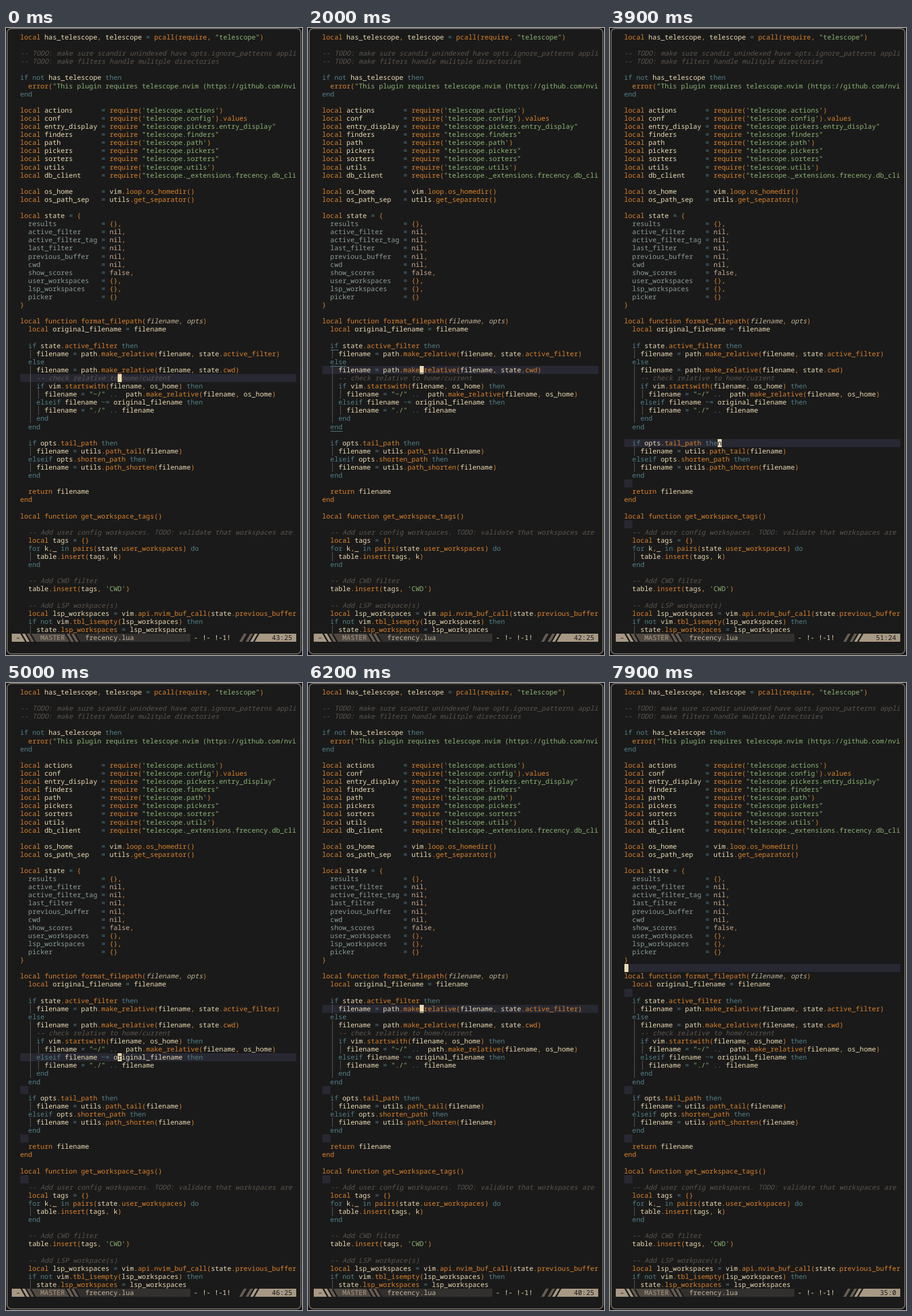
Write an HTML page that moves like this. It is 514 px wide and 1089 px high and loops after 8 s.

```html
<!DOCTYPE html>
<html lang="en">
<head>
<meta charset="utf-8">
<title>Editor cursor</title>
<style>
html, body { margin: 0; width: 100%; height: 100%; overflow: hidden; background: #111; }
#win { position: absolute; left: 1px; top: 0; width: 512px; height: 1088px; box-sizing: border-box;
  border: 2px solid #6b635a; border-radius: 8px; background: #1a1a1a; }
#code, svg { position: absolute; left: 0; top: 0; }
#code { width: 504px; height: 1089px; overflow: hidden; }
#code, text { font: 11.765px "Noto Sans Mono", "DejaVu Sans Mono", monospace;
  text-rendering: geometricPrecision; font-variant-ligatures: none; white-space: pre; }
#code div { position: absolute; left: 24.5px; height: 14.095px; line-height: 14.095px; }
.id { color: #ebdbb2; }
.or { color: #d9822b; }
.kw { color: #528088; }
.str { color: #8cb573; }
.key { color: #8b9d95; }
.nil { color: #c9ab93; }
.com { color: #5c544e; font-style: italic; }
.arg { color: #c3b497; font-style: italic; }
.bar { background: linear-gradient(#5f5750, #5f5750) 50% 0 / 1px 100% no-repeat; }
.match .pair { box-shadow: 0 -1px #528088 inset; }
#row { width: 480px; background: #282833; }
.blank { width: 14px; background: #282833; }
#cursor { width: 7.06px; background: #ebdbb2; color: #1a1a1a; }
</style>
</head>
<body>
<div id="win"></div>
<div id="code"></div>
<svg width="514" height="1089"></svg>
<script>
const source = `local has_telescope, telescope = pcall(require, "telescope")

-- TODO: make sure scandir unindexed have opts.ignore_patterns appli
-- TODO: make filters handle mulitple directories

if not has_telescope then
  error("This plugin requires telescope.nvim (https://github.com/nvi
end

local actions       = require('telescope.actions')
local conf          = require('telescope.config').values
local entry_display = require "telescope.pickers.entry_display"
local finders       = require "telescope.finders"
local path          = require('telescope.path')
local pickers       = require "telescope.pickers"
local sorters       = require "telescope.sorters"
local utils         = require('telescope.utils')
local db_client     = require("telescope._extensions.frecency.db_cli

local os_home       = vim.loop.os_homedir()
local os_path_sep   = utils.get_separator()

local state = {
  results           = {},
  active_filter     = nil,
  active_filter_tag = nil,
  last_filter       = nil,
  previous_buffer   = nil,
  cwd               = nil,
  show_scores       = false,
  user_workspaces   = {},
  lsp_workspaces    = {},
  picker            = {}
}

local function format_filepath(filename, opts)
  local original_filename = filename

  if state.active_filter then
  │ filename = path.make_relative(filename, state.active_filter)
  else
  │ filename = path.make_relative(filename, state.cwd)
  │ -- check relative to home/current
  │ if vim.startswith(filename, os_home) then
  │ │ filename = "~/" ..  path.make_relative(filename, os_home)
  │ elseif filename ~= original_filename then
  │ │ filename = "./" .. filename
  │ end
  end

  if opts.tail_path then
  │ filename = utils.path_tail(filename)
  elseif opts.shorten_path then
  │ filename = utils.path_shorten(filename)
  end

  return filename
end

local function get_workspace_tags()

  -- Add user config workspaces. TODO: validate that workspaces are
  local tags = {}
  for k,_ in pairs(state.user_workspaces) do
  │ table.insert(tags, k)
  end

  -- Add CWD filter
  table.insert(tags, 'CWD')

  -- Add LSP workpace(s)
  local lsp_workspaces = vim.api.nvim_buf_call(state.previous_buffer
  if not vim.tbl_isempty(lsp_workspaces) then
  │ state.lsp_workspaces = lsp_workspaces`;

const lines = source.split("\n");
const left = 24.5, charW = 7.059, rowH = 14.095;
const code = document.getElementById("code");
const svg = document.querySelector("svg");
const topOf = n => 9 + (n - 1) * rowH + "px";

function kind(word, at, n) {
  const line = lines[n - 1], next = line[at + word.length];
  if (word.startsWith("--")) return "com";
  if (/^["']/.test(word)) return "str";
  if (word === "│") return "bar";
  if (n === 58 || /^(local|function|return|require)$/.test(word)) return "or";
  if (/^(if|not|then|else|elseif|end|for|in|do|[~=]+|\.\.)$/.test(word))
    return [39, 41, 49].includes(n) && at === 2 ? "kw pair" : "kw";
  if (/^(nil|false)$/.test(word)) return "nil";
  if (!/\w/.test(word)) return "or";
  if (n > 23 && n < 34) return "key";
  if (n === 36 && at > 30) return "arg";
  return next === "(" || line[at - 1] === "." ? "or" : "id";
}

function add(n, html = "") {
  const div = document.createElement("div");
  div.innerHTML = html;
  div.style.top = topOf(n);
  code.append(div);
  return div;
}

const row = add(1);
row.id = "row";
const blanks = [38, 50, 56, 61].map(n => {
  const div = add(n);
  div.className = "blank";
  return { n, div };
});
const token = /--.*|"[^"]*"?|'[^']*'|│|\w+|[~=]=?|\.\.|[^\s\w]/g;
lines.forEach((line, i) => add(i + 1, line.replace(token, (word, at) =>
  `<span class="${kind(word, at, i + 1)}">${word === "│" ? " " : word}</span>`)));
const cursor = add(1);
cursor.id = "cursor";

// Status line: slanted segments, lean is the shift of the bottom edge
const slab = (x1, x2, fill, lean1, lean2 = lean1) =>
  `<path fill="${fill}" d="M${x1} 1052H${x2}l${lean2} 14H${x1 + lean1}z"/>`;
const label = (x, text, fill, extra = "") =>
  `<text x="${x}" y="1063.4" fill="${fill}" ${extra}>${text}</text>`;
const tan = "#a89984", brown = "#665c54", dark = "#32302f";
svg.innerHTML =
  slab(10, 25, tan, 0, 8) + slab(28, 33, tan, 8) + slab(36, 41, brown, 8) +
  slab(44, 102, "#504943", 8) + slab(105, 110, brown, 8) + slab(113, 118, brown, 8) +
  slab(121, 320, dark, 8, 0) +
  slab(413, 418, brown, -8) + slab(424, 429, brown, -8) + slab(432, 437, tan, -8) +
  slab(440, 504, tan, -8, 0) +
  label(17.5, "–", "#1a1a1a", 'font-weight="700"') +
  label(59.8, "MASTER", tan) + label(137.5, "frecency.lua", "#c5b699") +
  [[326, "-"], [341, "!-"], [362, "!-1!"]]
    .map(([x, s]) => label(x, s, "#ebdbb2", 'font-weight="700"')).join("") +
  label(497, "", "#1a1a1a", 'id="pos" text-anchor="end"');
const pos = document.getElementById("pos");

function lineAt(t) {
  if (t < 1000) return 43;
  if (t < 2000) return 42;
  if (t < 2800) return 42 + Math.floor((t - 2000) * 17 / 700);
  if (t < 3900) return Math.min(61, 90 - t / 100);
  return Math.max(35, 51 - Math.floor((t - 3900) / 200));
}

function draw(now) {
  const t = Math.floor(now % 8000 / 100) * 100;
  const n = lineAt(t), line = lines[n - 1];
  const col = Math.min(25, line.length), at = Math.max(0, col - 1);
  row.style.top = cursor.style.top = topOf(n);
  cursor.style.left = left + at * charW + "px";
  cursor.textContent = line[at] || " ";
  pos.textContent = n + ":" + col;
  code.classList.toggle("match", t >= 1000 && t <= 2000);
  for (const b of blanks) b.div.hidden = t < 2900 || n >= b.n;
}

const start = performance.now();
function tick() {
  draw(performance.now() - start);
  requestAnimationFrame(tick);
}
tick();
</script>
</body>
</html>
```
